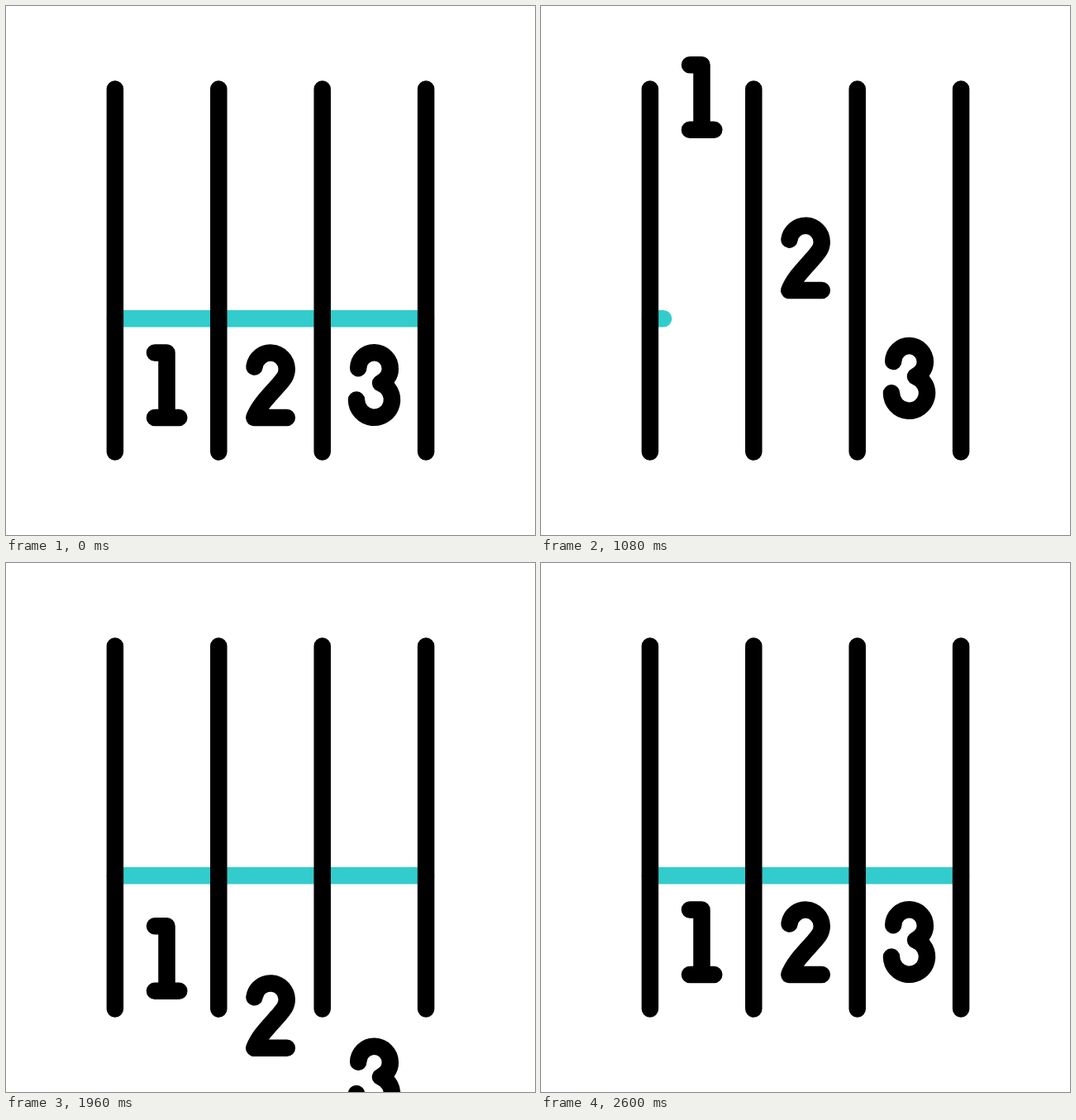
An HTML page that plays this animation: 640x640 px, repeating every 3000 ms.

```html
<!DOCTYPE html>
<html lang="en">
<head>
<meta charset="utf-8">
<title>Lanes</title>
<style>
  html, body { margin: 0; height: 100%; overflow: hidden; background: #fff; }
  svg { display: block; width: 100%; height: 100%; }
  path { fill: none; stroke: #000; stroke-width: 20.5; stroke-linecap: round; stroke-linejoin: round; }
  .line { stroke: #3cc; }
</style>
</head>
<body>
<svg viewBox="0 0 640 640">
  <path class="line"/><path class="line"/><path class="line"/>
  <path d="M131.9 100.5v439m125.4-439v439m125.4-439v439m125.4-439v439"/>
  <path class="digit" d="M180 419.5H194.5V498M180 498H209.3"/>
  <path class="digit" d="M300.5 436.5A19.7 19.7 0 0 1 339.7 439C339.7 447 336 451 331 457C318 472 306 483 300.3 498H339.8"/>
  <path class="digit" d="M426.2 438.2A19.3 19.3 0 0 1 464.8 439C464.8 447 460 453 453 456.2A21.5 21.5 0 1 1 424 476.5"/>
</svg>
<script>
const LOOP = 3000, STEP = 40, LEFT = 131.9, GAP = 125.4;
const lines = document.querySelectorAll('.line');
const digits = document.querySelectorAll('.digit');

const progress = (t, start, length) => Math.min(1, Math.max(0, (t - start) / length));
const smooth = u => u * u * (3 - 2 * u);
const easeOut = (u, power) => 1 - (1 - u) ** power;

// Dip a little, then shoot up off the stage
const leave = t => 26 * easeOut(progress(t, 480, 280), 3) - 617 * smooth(progress(t, 760, 560));

// Rise from below past the resting place, then settle
const enter = t => 285 * (1 - smooth(progress(t, 1630, 440))) - 24.7 * (1 - easeOut(progress(t, 2080, 360), 2.25));

const shrink = t => 1 - smooth(progress(t, 240, 206));
const grow = t => smooth(progress(t, 990, 400));

function draw(t) {
  lines.forEach((line, i) => {
    const size = t < 900 ? shrink(t - 120 * i) : grow(t - 252 * i);
    line.setAttribute('d', `M${LEFT + GAP * i} 378.2h${GAP * size}`);
    line.style.visibility = size > 0 ? 'visible' : 'hidden';
  });
  digits.forEach((digit, i) => {
    const y = t < 1600 ? leave(t - 120 * i) : enter(t - 80 * i);
    digit.setAttribute('transform', `translate(0 ${y})`);
  });
}

const begin = performance.now();
function tick() {
  const t = (performance.now() - begin) % LOOP;
  draw(Math.floor(t / STEP + 0.1) * STEP); // 25 poses a second
  requestAnimationFrame(tick);
}
tick();
</script>
</body>
</html>
```
